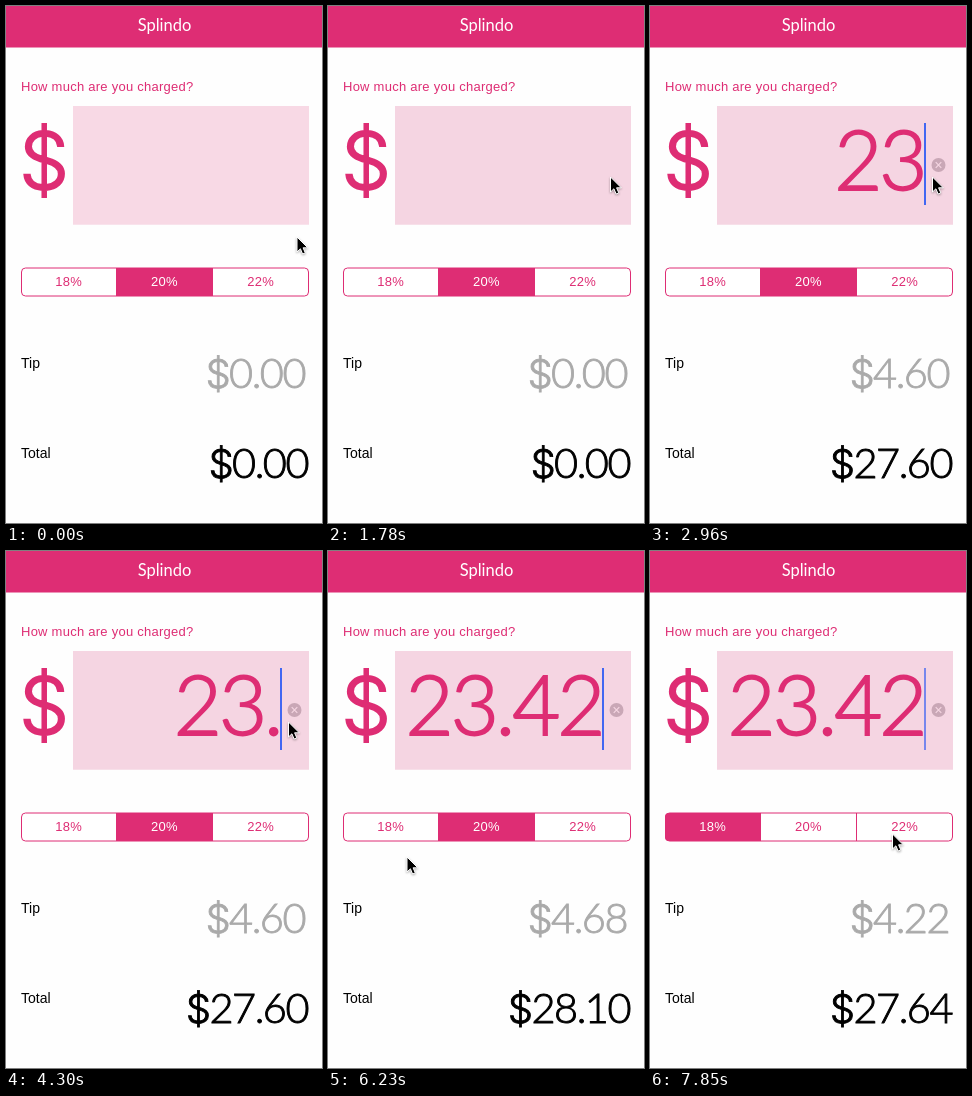
Recreate the animation shown at these times as an HTML page. Size 316 by 517 pixels, loop 8000 ms.

```html
<!DOCTYPE html>
<html lang="en">
<head>
<meta charset="utf-8">
<title>Tip calculator</title>
<style>
  html, body { margin: 0; width: 100%; height: 100%; overflow: hidden; background: #fefefe; }
  svg { display: block; width: 316px; height: 517px; --pink: #de2d74; }
  text { font: 13px "Liberation Sans", sans-serif; letter-spacing: .25px; }
  .pink { fill: var(--pink); }
  .label { font-size: 14px; letter-spacing: 0; }
  .title { font: 16.5px Lato, sans-serif; letter-spacing: 0; fill: #fff; text-anchor: middle; }
  .big, .sum { font: 300 83px Lato, sans-serif; letter-spacing: -.036em; text-anchor: end; stroke-width: 1.8px; }
  .big { fill: var(--pink); stroke: var(--pink); }
  .sum { font-size: 41.5px; stroke-width: .9px; }
  .sign { font-family: Inter, sans-serif; font-size: .95em; }
  .seg { text-anchor: middle; }
</style>
</head>
<body>
<svg viewBox="0 0 316 517">
  <rect width="316" height="41.5" class="pink"/>
  <text x="158.5" y="25" class="title">Splindo</text>
  <text x="15" y="85" class="pink">How much are you charged?</text>
  <rect id="field" x="67" y="100" width="236" height="118.7"/>
  <text x="60" y="183" class="big"><tspan class="sign">$</tspan></text>
  <text id="amount" x="274.5" y="183.5" class="big"></text>
  <g id="clear">
    <circle cx="288.5" cy="159" r="7" fill="#c9a7b6"/>
    <path d="M285.7 156.2l5.6 5.6m0-5.6l-5.6 5.6" stroke="#f5d5e2" stroke-width="1.2"/>
  </g>
  <rect id="caret" y="117" width="2" height="82" fill="#4267f2"/>
  <clipPath id="round"><rect x="15" y="262" width="288" height="28" rx="4"/></clipPath>
  <g id="segments" clip-path="url(#round)"></g>
  <path d="M110.5 262v28M206.5 262v28" stroke="#de2d74"/>
  <rect x="15.5" y="262" width="287" height="28" rx="4" fill="none" stroke="#de2d74"/>
  <text x="15" y="362" class="label">Tip</text>
  <text x="15" y="452" class="label">Total</text>
  <text x="299" y="382" class="sum" fill="#aaa" stroke="#aaa"><tspan class="sign">$</tspan><tspan id="tip"></tspan></text>
  <text x="302" y="471.5" class="sum" fill="#000" stroke="#000"><tspan class="sign">$</tspan><tspan id="total"></tspan></text>
  <path id="cursor" d="M0 0V15L3.4 11.8 5.6 17 8.3 15.9 6.1 10.8H10.8Z" fill="#000" stroke="#fff"
        style="filter: drop-shadow(0 1px 1px #0005)"/>
</svg>
<script>
const LOOP = 8000;
const $ = id => document.getElementById(id);

// Each step holds until the next; unnamed properties carry over.
const steps = [
  [0, { at: [291, 231], focus: 0, caret: 0, amount: '', rate: .2, on: [0, 1, 0] }],
  [290, { at: [287, 205] }],
  [440, { at: [283, 174] }],
  [590, { at: [282.5, 171], focus: 1, caret: .5 }],
  [740, { caret: 0 }],
  [1030, { caret: .3 }], [1180, { caret: .8 }], [1330, { caret: 1 }],
  [1630, { caret: .5 }], [1780, { caret: 0 }],
  [2080, { caret: .5 }], [2230, { caret: 1 }],
  [2530, { amount: '2' }],
  [2830, { amount: '23' }],
  [3560, { caret: .5 }], [3710, { caret: 0 }], [4000, { caret: 1 }],
  [4300, { amount: '23.' }],
  [4450, { amount: '23.4' }],
  [4900, { amount: '23.42' }],
  [5350, { at: [272, 184] }],
  [5500, { at: [238, 232], caret: .5 }],
  [5650, { at: [190, 288], caret: 0 }],
  [5790, { at: [142, 328] }],
  [5940, { at: [106, 345], caret: .5 }],
  [6080, { at: [88, 332], caret: 1 }],
  [6230, { at: [79, 306] }],
  [6370, { at: [72, 280] }],
  [6520, { at: [69, 268], caret: .5, on: [.15, 1, 0] }],
  [6670, { caret: 0, rate: .18, on: [.22, .9, 0] }],
  [6820, { on: [.44, .67, 0] }],
  [6970, { caret: .4, on: [.8, .25, 0] }],
  [7120, { at: [84, 271], caret: 1, on: [1, 0, 0] }],
  [7270, { at: [138, 280] }],
  [7410, { at: [206, 285] }],
  [7560, { at: [242.5, 283] }],
  [7850, { caret: .7 }]
];

const segments = [[15, 95.5, '18%'], [110.5, 96, '20%'], [206.5, 96.5, '22%']];
$('segments').innerHTML = segments.map(([x, width, label]) =>
  `<rect x="${x}" y="262" width="${width}" height="28"/>
   <text class="seg" x="${x + width / 2}" y="280">${label}</text>`).join('');
const fills = [...$('segments').querySelectorAll('rect')];
const labels = [...$('segments').querySelectorAll('text')];

const tint = amount => `color-mix(in srgb, #de2d74 ${amount * 100}%, #fff)`;

function draw(time) {
  const state = {};
  for (const [start, change] of steps) if (start <= time) Object.assign(state, change);
  const charged = Number(state.amount);

  $('field').setAttribute('fill', state.focus ? '#f5d5e2' : '#f8d9e5');
  $('amount').textContent = state.amount;
  $('clear').style.opacity = state.amount ? 1 : 0;
  $('caret').setAttribute('x', state.amount ? 274 : 301);
  $('caret').style.opacity = state.caret;
  $('tip').textContent = (charged * state.rate).toFixed(2);
  $('total').textContent = (charged * (1 + state.rate)).toFixed(2);
  $('cursor').setAttribute('transform', `translate(${state.at})`);
  state.on.forEach((amount, i) => {
    fills[i].style.fill = tint(amount);
    labels[i].style.fill = tint(1 - amount);
  });
}

const origin = performance.now();
function tick() {
  draw((performance.now() - origin) % LOOP);
  requestAnimationFrame(tick);
}
tick();
</script>
</body>
</html>
```
